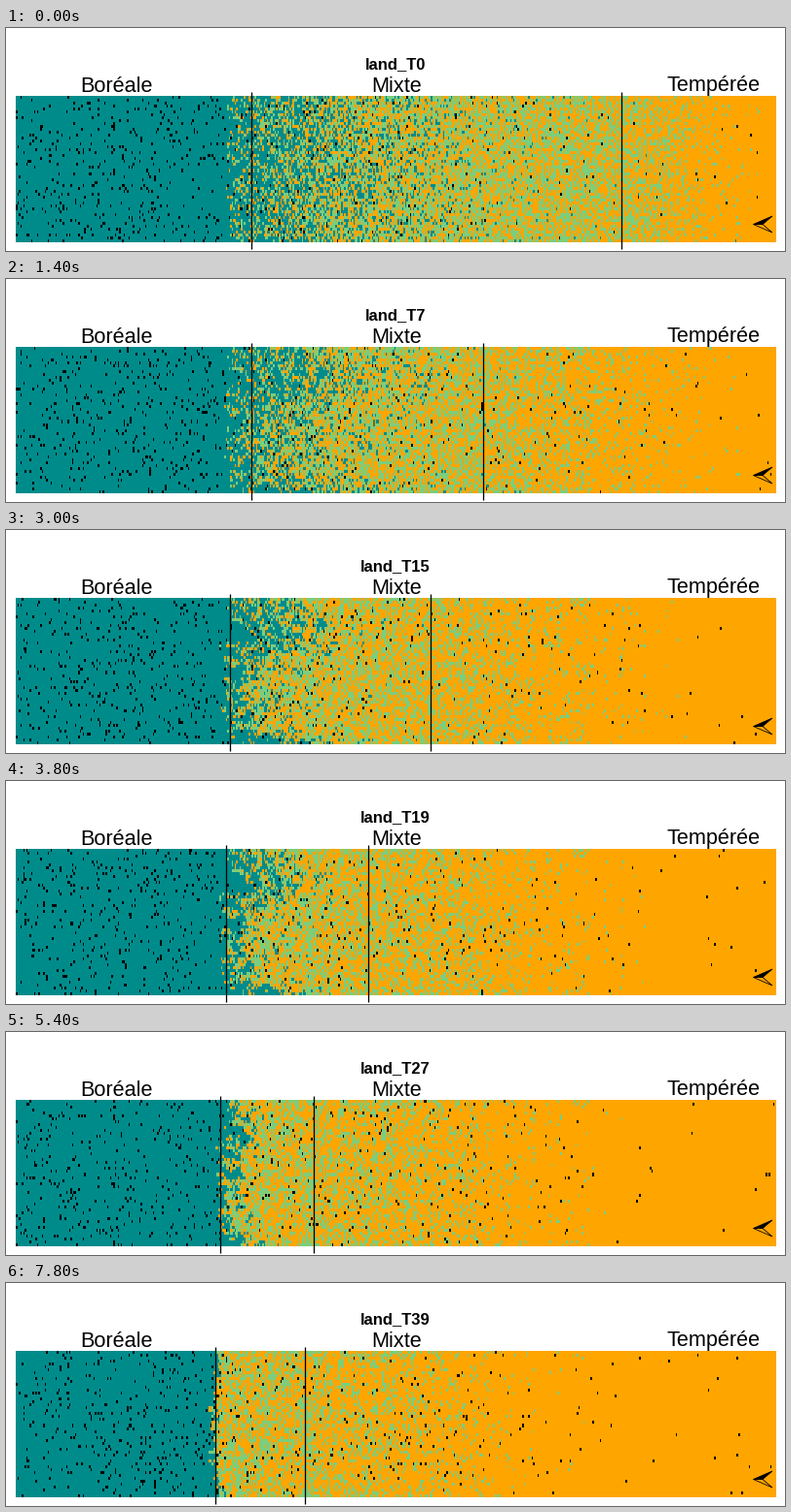
A matplotlib script for the animation above (8000 ms loop, 800 by 230 pixels).

```python
import numpy as np
import matplotlib.pyplot as plt
from matplotlib.animation import FuncAnimation
from matplotlib.patches import Polygon

W, H, DPI = 800, 230, 80
PT = 72 / DPI                       # points per pixel
STEPS, STEP_MS = 40, 200
COLS, ROWS = 500, 50
LEFT, RIGHT, TOP, BOTTOM = 10, 791, 70, 221
TEAL, GREEN, ORANGE, BLACK = range(4)
PALETTE = np.array([(0, 139, 139), (124, 205, 124), (255, 165, 0), (0, 0, 0)],
                   dtype=np.uint8)

x = LEFT + (np.arange(COLS) + 0.5) * (RIGHT - LEFT) / COLS
y = TOP + (np.arange(ROWS) + 0.5) * (BOTTOM - TOP) / ROWS

# Zone borders move through a few key positions.
KEYS = [0, 7, 11, 15, 23, 31, 39]
WEST = [252, 252, 231.5, 230, 222, 218, 214.5]
EAST = [632, 489.5, 483, 436, 307, 325, 307]


def normal(field):
    return (field - field.mean()) / field.std()


def smooth(field, rx, ry):
    out = np.zeros_like(field)
    for dy in range(-2 * ry, 2 * ry + 1):
        for dx in range(-2 * rx, 2 * rx + 1):
            weight = np.exp(-(dx / rx) ** 2 - (dy / ry) ** 2)
            out += weight * np.roll(field, (dy, dx), (0, 1))
    return normal(out)


def ranks(field):
    order = np.empty(field.size)
    order[field.argsort(axis=None)] = np.arange(field.size)
    return order.reshape(field.shape) / field.size


def bump(pos, centre, width):
    return np.exp(-((pos - centre) / width) ** 2)


rng = np.random.default_rng(12)
grain_a, grain_b, noise_a, noise_b = rng.standard_normal((4, ROWS, COLS))
clump_a, clump_b = smooth(noise_a, 2, 1), smooth(noise_b, 1, 1)

# Conifers hold on longest in the upper half and along the lower edge.
refuge = (1.1 * bump(y, 100, 30) + 1.5 * bump(y, BOTTOM, 12))[:, None]
border = (np.exp((TOP - y) / 4) + np.exp((y - BOTTOM) / 4))[:, None]
bulge = 5 * bump(y, 124, 9) + 2 * bump(y, 183, 7)
ragged = rng.uniform(-2, 2, ROWS)
burn_rate = np.where(x < 222, 0.055, np.clip(0.028 * (1 - (x - 235) / 500), 0.003, 1))


def front(t):
    return 230 - 16 * (t / 39) ** 1.5


def boreal_share(t):
    reach = 3 + 140 * (1 - t / 42) ** 2
    depth = np.clip(x - front(t), 0, None)
    return 0.72 * np.exp(-(depth / reach) ** 1.6)


def mixed_share(t):
    centre = 360 + 330 * np.exp(-t / 17)
    width = 65 - 38 * np.exp(-t / 4)
    return 0.52 / (1 + np.exp((x - centre) / width)) - 0.02


def land(t):
    age = 1 - np.exp(-t / 12)
    score_a = (1 - 0.6 * age) * grain_a + 0.6 * age * clump_a - age * refuge
    score_b = grain_b + age * (0.6 * clump_b - 0.7 * border)

    edge = (front(t) + ragged - bulge)[:, None]
    lead = np.clip((x - edge + 4) / 8, 0, 1)
    boreal = 1 - lead * (1 - boreal_share(t))

    cells = np.where(ranks(score_b) < mixed_share(t), GREEN, ORANGE)
    cells[ranks(score_a) < boreal] = TEAL
    burnt = np.random.default_rng(100 + t).random((ROWS, COLS))
    cells[burnt < burn_rate] = BLACK
    return PALETTE[cells]


fig = plt.figure(figsize=(W / DPI, H / DPI), dpi=DPI, facecolor="white")
ax = fig.add_axes([0, 0, 1, 1])
grid = ax.imshow(land(0), extent=(LEFT, RIGHT, BOTTOM, TOP),
                 interpolation="nearest", aspect="auto", zorder=2)
ax.set_xlim(0, W)
ax.set_ylim(H, 0)
ax.axis("off")


def label(px, base, text, size, weight="normal"):
    # The map covers the descenders.
    return ax.text(px, base, text, fontsize=size * PT, family="Liberation Sans",
                   weight=weight, ha="center", va="baseline", zorder=1)


title = label(400, 42, "", 16.7, "bold")
for px, name in [(114, "Boréale"), (401, "Mixte"), (727, "Tempérée")]:
    label(px, 65.5, name, 21.7)

west, east = (ax.plot([0, 0], [66, 227.5], color="black", lw=1.3 * PT,
                      solid_capstyle="butt", zorder=3)[0] for _ in range(2))

# North arrow, pointing left
tip, notch = (767.5, 202.5), (777, 202.5)
for tail, fill in [((787, 194), "black"), ((787, 211), "none")]:
    ax.add_patch(Polygon([tip, tail, notch], facecolor=fill, edgecolor="black",
                         lw=0.8 * PT, zorder=3))


def update(t):
    grid.set_data(land(t))
    title.set_text(f"land_T{t}")
    for line, path in [(west, WEST), (east, EAST)]:
        line.set_xdata([np.interp(t, KEYS, path)] * 2)
    return grid, title, west, east


anim = FuncAnimation(fig, update, frames=STEPS, interval=STEP_MS,
                     init_func=lambda: update(0), repeat=True, repeat_delay=0)
plt.show()
```
